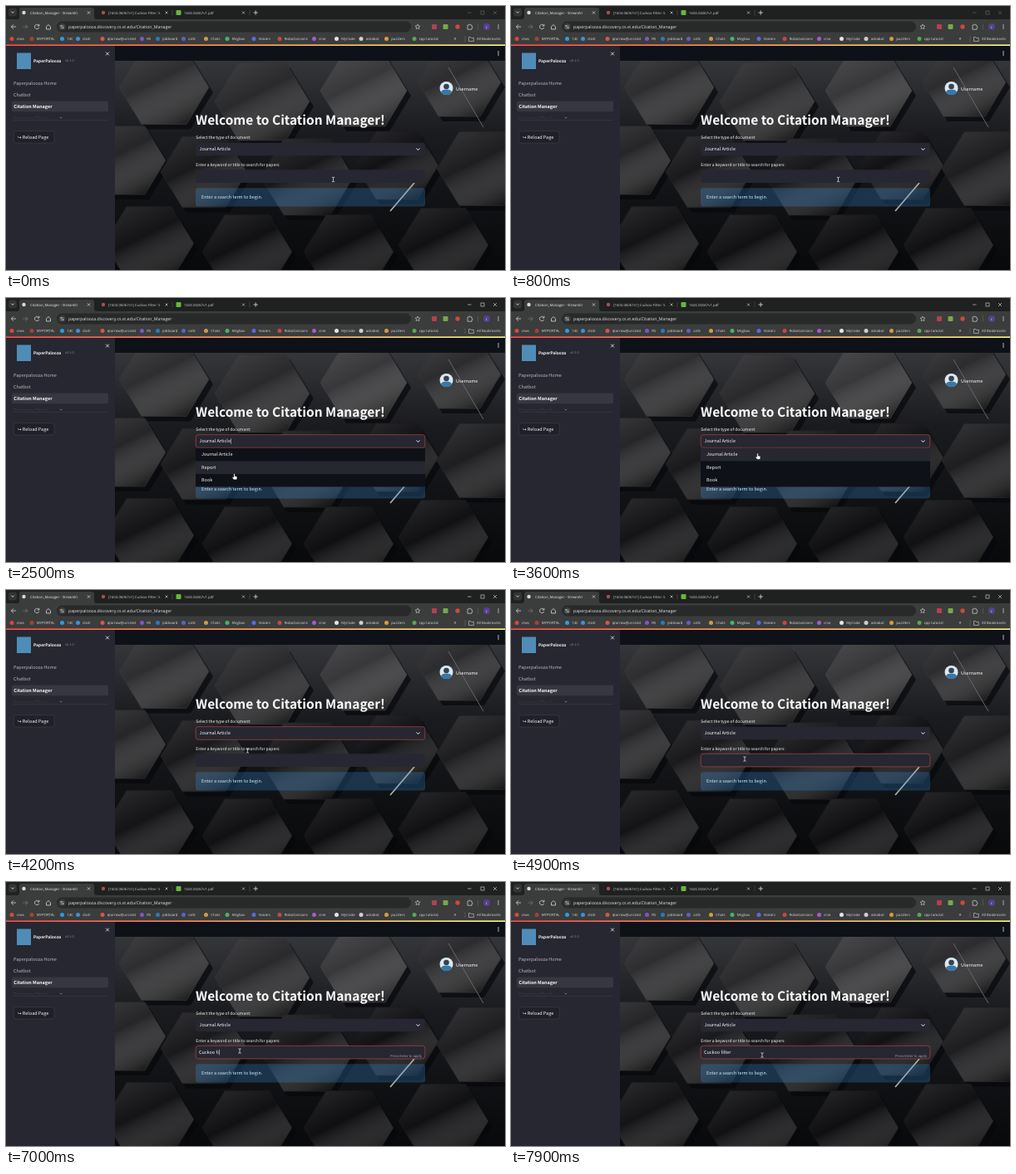
These frames come from a looping animation (600x318 px, 8 s). An HTML page:

```html
<!DOCTYPE html>
<html lang="en">
<head>
<meta charset="utf-8">
<title>Citation Manager</title>
<style>
  html, body { margin: 0; width: 100%; height: 100%; overflow: hidden; background: #0e1117; }
  svg { display: block; width: 100%; height: 100%; }
  text { text-rendering: geometricPrecision; white-space: pre; }
  .page { font-family: "Noto Sans CJK SC", "Noto Sans CJK JP", "Noto Sans CJK", "Open Sans", sans-serif; font-weight: 500; }
  .chrome { font-family: "Open Sans", "Noto Sans", sans-serif; }
</style>
</head>
<body>
<svg id="stage" viewBox="0 0 600 318"></svg>
<script>
const LOOP = 8000;
const QUERY = 'Cuckoo filter';
const BODY = 5.51, LABEL = 4.95;
const INK = '#fafafa';

const rect = (x, y, w, h, fill, extra = '') =>
  `<rect x="${x}" y="${y}" width="${w}" height="${h}" fill="${fill}" ${extra}/>`;
const dot = (x, y, r, fill, extra = '') =>
  `<circle cx="${x}" cy="${y}" r="${r}" fill="${fill}" ${extra}/>`;
const line = (d, stroke, width = 0.8, extra = '') =>
  `<path d="${d}" fill="none" stroke="${stroke}" stroke-width="${width}" ${extra}/>`;
// y is the vertical middle of the line of text
const text = (x, y, str, size, fill, extra = '') =>
  `<text x="${x}" y="${y + size * 0.36}" font-size="${size}" fill="${fill}" ${extra}>${str}</text>`;
const cross = (x, y, r, color, width = 0.7) =>
  line(`M${x - r} ${y - r}l${2 * r} ${2 * r}m0 ${-2 * r}l${-2 * r} ${2 * r}`, color, width);
const chevron = (x, y, r, color, width = 0.9) =>
  line(`M${x - r} ${y - r / 2}l${r} ${r}l${r} ${-r}`, color, width);
const dots = (x, y, color) => [-2, 0, 2].map(d => dot(x, y + d, 0.65, color)).join('');

function defs() {
  const shade = (id, stops, dir = 'x1="0.2" y1="0" x2="0.8" y2="1"') =>
    `<linearGradient id="${id}" ${dir}>${stops.map(([o, c, a = 1]) =>
      `<stop offset="${o}" stop-color="${c}" stop-opacity="${a}"/>`).join('')}</linearGradient>`;
  const down = 'x1="0" y1="0" x2="0" y2="1"', across = 'x1="0" y1="0" x2="1" y2="0"';
  return `<defs>
    ${shade('gloss', [[0, '#fff', 0.09], [0.4, '#fff', 0], [1, '#000', 0.5]])}
    ${shade('depth', [[0, '#35363a'], [0.35, '#1a1b1e'], [1, '#08090b']], down)}
    ${shade('accent', [[0, '#ff4b4b'], [1, '#fffd80']], across)}
    ${shade('fade', [[0, '#262730', 0.25], [1, '#262730', 1]], down)}
    <clipPath id="mainClip"><rect x="131" y="66" width="469" height="252"/></clipPath>
    <clipPath id="navClip"><rect x="0" y="129" width="131" height="7.5"/></clipPath>
  </defs>`;
}

// Raised hexagonal columns: centre, radius, brightness of the top face
const columns = [
  [190, 98, 54, 46], [308, 115, 57, 42], [430, 102, 52, 56], [545, 92, 50, 44],
  [142, 186, 50, 38], [238, 200, 52, 26], [362, 206, 56, 24], [470, 192, 50, 18], [572, 196, 54, 30],
  [172, 286, 54, 20], [290, 296, 54, 17], [412, 296, 54, 15], [526, 288, 54, 17]
];

function backdrop() {
  const outline = (cx, cy, r) => Array.from({ length: 6 }, (_, i) => {
    const a = i * Math.PI / 3;
    return `${(cx + r * Math.cos(a)).toFixed(1)},${(cy + r * 0.95 * Math.sin(a)).toFixed(1)}`;
  }).join(' ');
  const gray = v => `rgb(${v},${v},${v + 2})`;
  const tiles = columns.map(([cx, cy, r, v]) =>
    `<polygon points="${outline(cx + 5, cy + 6, r)}" fill="#07080a" opacity="0.7"/>
     <polygon points="${outline(cx, cy, r)}" fill="${gray(v)}"/>
     <polygon points="${outline(cx, cy, r)}" fill="url(#gloss)" stroke="${gray(v + 10)}" stroke-width="0.7"/>`).join('');
  return `<g clip-path="url(#mainClip)">${rect(131, 66, 469, 252, 'url(#depth)')}${tiles}
    ${line('M532 74L574 146', '#66676b', 1)}
    ${line('M462 247L491 213', '#b3a9a0', 1.8)}</g>`;
}

function tabStrip() {
  const soft = '#c9c9c9';
  return rect(0, 0, 600, 16, '#1f2020')
    + rect(3, 2.5, 10, 10, '#333435', 'rx="3"') + chevron(8, 7.5, 1.7, '#ddd')
    + `<path d="M13 16Q16 16 16 13V5Q16 2 19 2H103Q106 2 106 5V13Q106 16 109 16Z" fill="#3b3c3c"/>`
    + dot(21.5, 8, 2.2, '#d8d8d8')
    + text(29, 8, 'Citation_Manager - Streamlit', 4.3, '#eee') + cross(99.5, 8, 1.6, '#ddd')
    + dot(117, 8, 2.2, '#a8504f')
    + text(123, 8, '[1604.06067v1] Cuckoo Filter: S', 4.3, soft) + cross(193, 8, 1.5, soft)
    + line('M200 4.5V11.5', '#555', 0.6)
    + rect(204.5, 5, 6, 6, '#64b83c', 'rx="1"')
    + text(214, 8, '1604.06067v1.pdf', 4.3, soft) + cross(285.5, 8, 1.5, soft)
    + line('M293 4.5V11.5', '#555', 0.6)
    + line('M297.5 8h5.4M300.2 5.3v5.4', '#ddd')
    + `<g id="windowButtons">${line('M555 8h4.5', '#ddd', 0.6)}
        ${rect(571, 6, 4, 4, 'none', 'stroke="#ddd" stroke-width="0.6"')}${cross(588, 8, 2, '#ddd', 0.6)}</g>`;
}

function toolbar() {
  const ink = '#d5d5d5';
  return rect(0, 16, 600, 31, '#3b3c3c')
    + line('M12 25H6.5M9 22.3L6.3 25L9 27.7', ink) + line('M20.5 25H26M23.5 22.3L26.2 25L23.5 27.7', '#777')
    + line('M39.5 23.6A2.7 2.7 0 1 0 39.7 26M39.9 21.8V24H37.6', ink)
    + line('M48.5 24.8L51 22.5L53.5 24.8V28H48.5Z', ink)
    + rect(61, 18.5, 426, 13, '#282929', 'rx="6.5"') + dot(67.5, 25, 4.3, '#3d3e3e')
    + line('M65.5 24h4M65.5 26.3h4', ink, 0.6) + dot(66.3, 24, 0.8, ink) + dot(68.7, 26.3, 0.8, ink)
    + text(75, 25, 'paperpalooza.discovery.cs.vt.edu/Citation_Manager', 5.2, '#e6e6e6')
    + line('M495 22l.9 2 2.1.2-1.6 1.4.5 2.1-1.9-1.1-1.9 1.1.5-2.1-1.6-1.4 2.1-.2Z', ink, 0.6)
    + rect(512, 22, 6, 6, '#b5404c', 'rx="1"') + rect(525.5, 22, 6, 6, '#76a84d', 'rx="1"')
    + dot(543, 25, 2.7, '#c94a3c')
    + line('M555 23h1.5a1 1 0 1 1 2 0h1.5v1.6a1 1 0 1 1 0 2v1.6h-5Z', ink, 0.7)
    + line('M567.5 21.5v7', '#666', 0.6)
    + dot(578, 25, 4, '#56418f') + text(576.8, 25, 'c', 4.3, '#ddd') + dots(592, 25, ink);
}

function bookmarks() {
  const items = [
    [7, 'crws', '#d8473f'], [31, 'MYPORTAL', '#a6413a'], [67.5, '14C', '#2f9be0'],
    [86.5, 'clsdr', '#3f8fd8'], [116, 'qtarrow@uni.test', '#d8564a'], [163.5, 'RS', '#7e55c4'],
    [182.5, 'jobboard', '#2d78c0'], [213.5, 'calls', '#5b62c4'], [240.5, 'Chats', '#d09a45'],
    [266, 'Msgbox', '#42b862'], [298, 'Voicers', '#5b6ae0'], [329, 'RobotLessons', '#c84842'],
    [370.5, 'crse', '#a45bd0'], [397.5, 'MyCode', '#e4e4e4'], [427, 'askabot', '#cfcfcf'],
    [457.5, 'puzzlers', '#d89a3c'], [491, 'cpp tutorial', '#55a954']
  ];
  return items.map(([x, label, color]) =>
    dot(x, 39.5, 2.5, color) + text(x + 5.7, 39.5, label, 4.3, '#dcdcdc')).join('')
    + text(538.5, 39, '»', 6, '#ddd') + line('M552 36v7', '#666', 0.6)
    + line('M556.5 37.5h2l.8.9h3v4h-5.8Z', '#d5d5d5', 0.6)
    + text(566, 39.5, 'All Bookmarks', 4.3, '#dcdcdc');
}

function sidebar() {
  const muted = '#b9bac1';
  return rect(0, 48, 131, 270, '#262730')
    + rect(13, 56.5, 17, 19.5, '#4f8db8')
    + text(33, 66, 'PaperPalooza', LABEL, INK, 'font-weight="700"')
    + text(71, 66, 'v0.1.0', 3.9, '#8b8d96') + cross(122, 57.5, 1.9, INK, 0.8)
    + text(9, 93, 'Paperpalooza Home', BODY, muted) + text(9, 107, 'Chatbot', BODY, muted)
    + rect(7, 114.5, 116, 12.8, '#363741', 'rx="2"')
    + text(9.3, 121, 'Citation Manager', BODY, INK, 'font-weight="700"')
    + `<g clip-path="url(#navClip)">${text(9, 135, 'Grammar Check', BODY, '#7a7b84')}</g>`
    + rect(0, 129, 131, 8, 'url(#fade)') + chevron(66, 134.5, 1.3, '#9a9ba3', 0.7)
    + line('M9 137.5H123', '#3b3c46', 0.6)
    + rect(9.3, 150.6, 48.8, 14.4, '#1f2029', 'rx="3" stroke="#474852" stroke-width="0.5"')
    + text(14, 158, '↪ Reload Page', BODY, INK);
}

function focusRing(id, y) {
  return rect(228.2, y, 275.6, 15.6, 'none', `id="${id}" rx="3" stroke="#b34343" stroke-width="0.7"`);
}

function mainPanel() {
  return rect(131, 48, 469, 18, '#0e1117') + dots(592, 57, INK) + backdrop()
    + dot(529.5, 99, 8, '#d8e9f3')
    + `<path d="M523 103.8Q524 100.5 529.5 100.5T536 103.8A8 8 0 0 1 523 103.8Z" fill="#3878a8"/>`
    + dot(529.5, 97, 3.3, '#38424e')
    + text(541, 100, 'Username', BODY, INK)
    + text(228, 137.5, 'Welcome to Citation Manager!', 15.45, INK, 'font-weight="700"')
    + text(228.3, 158, 'Select the type of document:', LABEL, INK)
    + rect(228, 164.7, 276, 15.6, '#262730', 'rx="3"')
    + text(232.5, 172.5, 'Journal Article', BODY, INK, 'id="choice"')
    + chevron(495.5, 172.5, 2, INK, 1)
    + text(228.3, 191, 'Enter a keyword or title to search for papers:', LABEL, INK)
    + rect(228, 197.3, 276, 15.6, '#262730', 'rx="3"')
    + text(232, 205, '', BODY, INK, 'id="query"')
    + `<g id="hint">${text(462, 209.6, 'Press Enter to apply', 4.13, '#a3a4ab')}</g>`
    + rect(228, 219.2, 276, 22.2, '#3d9df3', 'rx="3" fill-opacity="0.24"')
    + text(235, 230.5, 'Enter a search term to begin.', BODY, '#c7ebff')
    + focusRing('selectRing', 164.7) + focusRing('inputRing', 197.3)
    + `<g id="menu">${rect(228, 180.8, 276, 46.6, '#0e1117')}
        ${rect(228, 181, 276, 15.5, '#262730', 'id="hover"')}
        ${['Journal Article', 'Report', 'Book'].map((s, i) => text(235, 188.5 + i * 15.5, s, BODY, INK)).join('')}</g>`
    + rect(0, 0, 0.5, 6.6, INK, 'id="caret"');
}

function pointers() {
  return `<g id="beam">${line('M-1.6 -2.8Q0 -2.8 0 -1.8Q0 -2.8 1.6 -2.8M0 -1.8V1.8M-1.6 2.8Q0 2.8 0 1.8Q0 2.8 1.6 2.8', '#f4f4f4', 0.7)}</g>
    <g id="hand"><path d="M-.7 .5Q0 -.5 .7 .5V3L2.6 3.5Q3.6 3.8 3.4 5L2.9 7.3H-.6L-2.5 4.8Q-2.4 3.6 -.7 4.6Z"
      fill="#fff" stroke="#111" stroke-width="0.35"/></g>`;
}

const svg = document.getElementById('stage');
svg.innerHTML = defs()
  + `<g class="page">${mainPanel()}${sidebar()}</g>`
  + `<g class="chrome">${tabStrip()}${toolbar()}${bookmarks()}</g>`
  + rect(0, 46.4, 600, 1.6, 'url(#accent)')
  + pointers();

const el = id => document.getElementById(id);
const show = (id, on) => el(id).setAttribute('visibility', on ? 'visible' : 'hidden');
const clamp = (v, lo, hi) => Math.min(hi, Math.max(lo, v));
const smooth = u => u * u * (3 - 2 * u);

// time, x, y
const path = [
  [0, 393.5, 209], [800, 393.5, 209], [1500, 367, 175], [1850, 367, 175],
  [2450, 274.5, 211.5], [2900, 274.5, 211.5], [3500, 296.5, 187], [3900, 296.5, 187],
  [4600, 281, 203.5], [7200, 281, 203.5], [7700, 302, 208.5], [LOOP, 302, 208.5]
];

function pointerAt(t) {
  const i = Math.max(1, path.findIndex(k => k[0] > t));
  const [t0, x0, y0] = path[i - 1], [t1, x1, y1] = path[i];
  const u = smooth((t - t0) / (t1 - t0));
  return [x0 + (x1 - x0) * u, y0 + (y1 - y0) * u];
}

function render(t) {
  const [x, y] = pointerAt(t);
  const open = t >= 1800 && t < 3800;
  const hand = open && y > 180;
  show('beam', !hand);
  show('hand', hand);
  el(hand ? 'hand' : 'beam').setAttribute('transform', `translate(${x} ${y})`);

  // the window is inactive until the first click
  el('windowButtons').setAttribute('opacity', t < 1600 ? 0.4 : 1);

  show('menu', open);
  el('hover').setAttribute('y', 181 + 15.5 * clamp(Math.floor((y - 181) / 15.5), 0, 2));

  const selectFocus = t < 4750 ? clamp((t - 1600) / 180, 0, 1) : 0;
  el('selectRing').setAttribute('opacity', selectFocus);
  el('inputRing').setAttribute('opacity', clamp((t - 4750) / 150, 0, 1));

  const typed = clamp(Math.floor((t - 5600) / 165) + 1, 0, QUERY.length);
  el('query').textContent = QUERY.slice(0, typed);
  show('hint', typed > 0);

  const selectCaret = t >= 1600 && t < 3000 && t % 1000 >= 450;
  const inputCaret = t >= 5000 && t % 1000 < 500;
  show('caret', selectCaret || inputCaret);
  const field = el(inputCaret ? 'query' : 'choice');
  const width = field.textContent ? field.getComputedTextLength() : 0;
  el('caret').setAttribute('x', 232.6 + width);
  el('caret').setAttribute('y', inputCaret ? 201.8 : 169.2);
}

const start = performance.now();
function tick() {
  render((performance.now() - start) % LOOP);
  requestAnimationFrame(tick);
}
tick();
</script>
</body>
</html>
```
